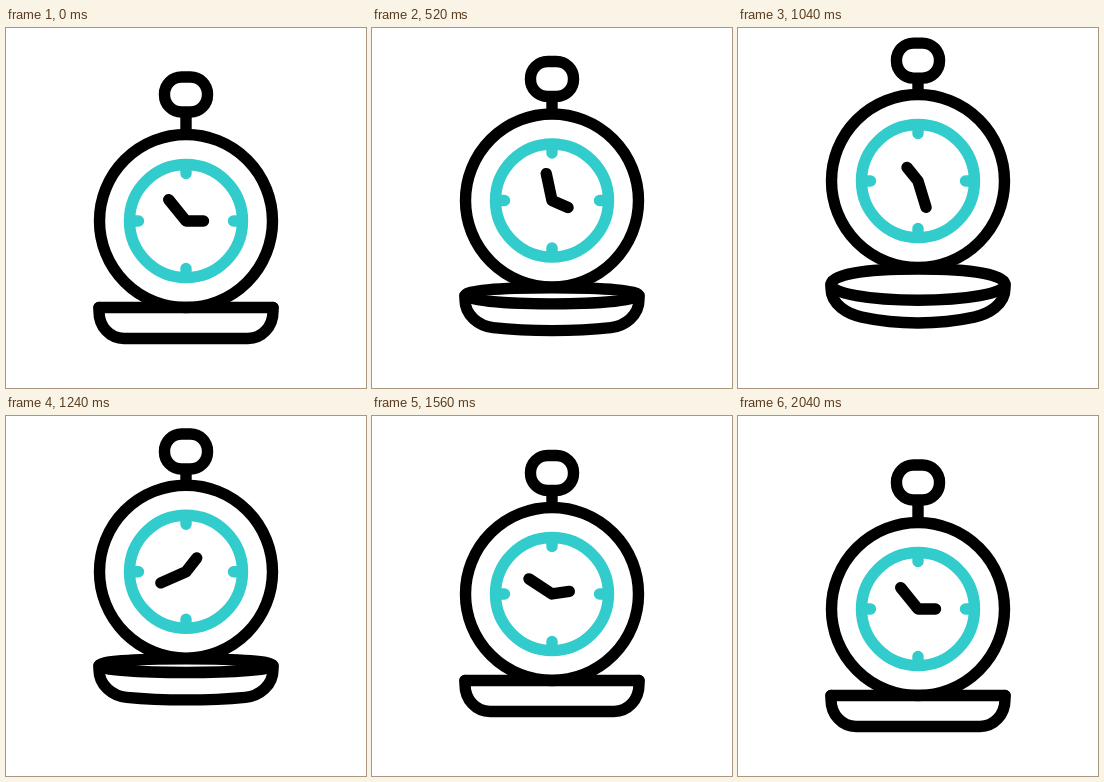
An HTML page with a canvas for the animation above (2080 ms loop, 360x360 px).

```html
<!DOCTYPE html>
<html lang="en">
<head>
<meta charset="utf-8">
<title>Pocket watch</title>
<style>
  html, body { margin: 0; width: 100%; height: 100%; overflow: hidden; background: #fff; }
  canvas { display: block; }
</style>
</head>
<body>
<canvas id="stage" width="360" height="360"></canvas>
<script>
const ctx = document.getElementById('stage').getContext('2d');
const LOOP = 2080, CX = 180, INK = '#000', TEAL = '#33cccc';

// Symmetric cubic-bezier(k, 0, 1 - k, 1), run from time a to time b.
function ease(t, a, b, k) {
  const p = (t - a) / (b - a);
  if (p <= 0) return 0;
  if (p >= 1) return 1;
  let lo = 0, hi = 1;
  for (let i = 0; i < 24; i++) {
    const s = (lo + hi) / 2;
    const x = 3 * s * (1 - s) * ((1 - s) * k + s * (1 - k)) + s ** 3;
    if (x < p) lo = s; else hi = s;
  }
  return lo * lo * (3 - 2 * lo);
}

function stroke(color, build) {
  ctx.strokeStyle = color;
  ctx.beginPath();
  build();
  ctx.stroke();
}

const circle = (y, r) => ctx.arc(CX, y, r, 0, 2 * Math.PI);

function polar(y, length, degrees) {
  const a = degrees * Math.PI / 180;
  return [CX + length * Math.sin(a), y - length * Math.cos(a)];
}

// Half of the lid's rim, from side to side through the middle height.
function rimHalf(rim, middle, fullness) {
  const handle = rim + (middle - rim) * fullness;
  const reach = 87 * fullness;
  ctx.moveTo(93, rim);
  ctx.bezierCurveTo(93, handle, CX - reach, middle, CX, middle);
  ctx.bezierCurveTo(CX + reach, middle, 267, handle, 267, rim);
}

function drawLid(y, open) {
  const back = y + 86.5 + 1.5 * open;
  const front = y + 86.5 + 33.5 * open;
  const rim = (back + front) / 2;
  const bottom = y + 117.5 + 25 * open;
  const corner = bottom - 6 * open;
  const side = rim + 0.62 * (corner - rim);
  const inset = 62 - 6 * open;

  stroke(INK, () => {
    rimHalf(rim, back, 0.64);
    rimHalf(rim, front, 0.56);
  });
  stroke(INK, () => {
    ctx.moveTo(93, rim);
    ctx.lineTo(93, rim + 4);
    ctx.bezierCurveTo(93, side, CX - inset - 14, corner - 3 * open, CX - inset, corner);
    ctx.bezierCurveTo(CX - inset + 18, corner + 4 * open, 160, bottom, CX, bottom);
    ctx.bezierCurveTo(200, bottom, CX + inset - 18, corner + 4 * open, CX + inset, corner);
    ctx.bezierCurveTo(CX + inset + 14, corner - 3 * open, 267, side, 267, rim + 4);
    ctx.lineTo(267, rim);
  });
}

function drawWatch(y, ringY, minute, hour) {
  stroke(INK, () => ctx.roundRect(158.5, ringY - 17.5, 43, 35, 17));
  stroke(INK, () => {
    ctx.moveTo(CX, ringY + 19);
    ctx.lineTo(CX, y - 87);
  });
  stroke(INK, () => circle(y, 86.5));
  stroke(TEAL, () => circle(y, 56.5));
  stroke(TEAL, () => {
    for (let a = 0; a < 360; a += 90) {
      ctx.moveTo(...polar(y, 56, a));
      ctx.lineTo(...polar(y, 47.5, a));
    }
  });
  stroke(INK, () => {
    ctx.moveTo(...polar(y, 27.5, minute));
    ctx.lineTo(CX, y);
    ctx.lineTo(...polar(y, 17.5, hour));
  });
}

function draw(t) {
  const y = 193 - 40 * (ease(t, 16, 1016, 0.6) - ease(t, 1010, 2010, 0.6));
  const ringY = 66.5 - 34 * (ease(t, 10, 1070, 0.6) - ease(t, 1000, 1940, 0.6));
  const open = ease(t, 320, 720, 1 / 3) - ease(t, 1000, 1440, 1 / 3);
  const minute = -39 + 360 * ease(t, 0, 2000, 2 / 3);
  const hour = 90 + 360 * ease(t, 60, 1860, 0.7);

  ctx.fillStyle = '#fff';
  ctx.fillRect(0, 0, 360, 360);
  ctx.lineWidth = 11.4;
  ctx.lineCap = ctx.lineJoin = 'round';
  drawLid(y, open);
  drawWatch(y, ringY, minute, hour);
}

const start = performance.now();
function tick() {
  draw((performance.now() - start) % LOOP);
  requestAnimationFrame(tick);
}
tick();
</script>
</body>
</html>
```
